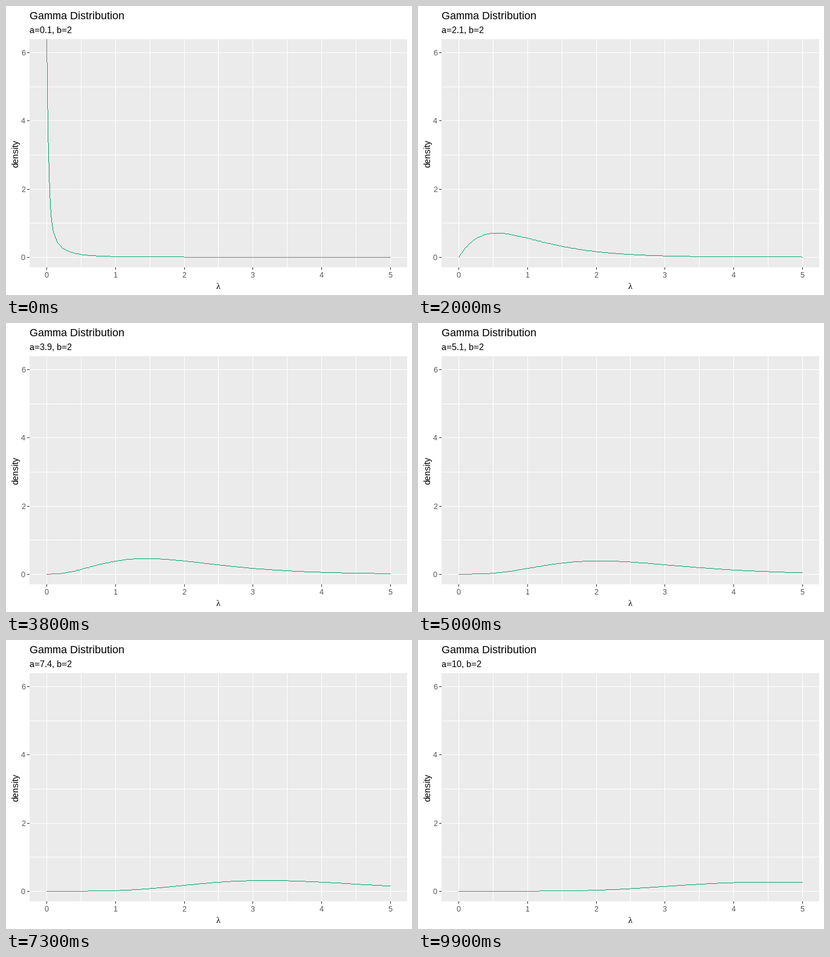
Write a matplotlib script that moves like this. It is 672 px wide and 480 px high and loops after 10 s.

```python
import math

import matplotlib.pyplot as plt
import numpy as np
from matplotlib.animation import FuncAnimation
from matplotlib.patches import Rectangle

W, H, DPI = 672, 480, 96
LEFT, RIGHT, TOP, BOTTOM = 39, 664, 55, 434      # panel, in pixels
X0, X_UNIT = 67.53, 113.74
Y0, Y_UNIT = 417.062, 56.52
RATE = 2
FRAMES, INTERVAL = 100, 100

GREEN = (0, 166, 115, 255)
GREY = (127, 127, 127, 255)

plt.rcParams.update({
    "font.family": "Liberation Sans",
    "text.hinting": "default",
    "text.hinting_factor": 1,
})


def px(x):
    return np.floor(X0 + X_UNIT * np.asarray(x)).astype(int)


def py(y):
    return np.floor(Y0 - Y_UNIT * np.asarray(y)).astype(int)


def gamma_pdf(x, a):
    """Gamma density with shape a and rate RATE, including x = 0."""
    y = np.empty_like(x)
    y[0] = np.inf if a < 1 else RATE if a == 1 else 0
    t = x[1:]
    y[1:] = np.exp(a * math.log(RATE) + (a - 1) * np.log(t)
                   - RATE * t - math.lgamma(a))
    return y


def trace(cols, rows):
    """Pixels of a one-pixel polyline through integer vertices."""
    out_c, out_r = [], []
    for c0, r0, c1, r1 in zip(cols, rows, cols[1:], rows[1:]):
        n = max(abs(c1 - c0), abs(r1 - r0)) + 1
        out_c.append(np.rint(np.linspace(c0, c1, n)))
        out_r.append(np.rint(np.linspace(r0, r1, n)))
    return (np.concatenate(out_c).astype(int),
            np.concatenate(out_r).astype(int))


fig = plt.figure(figsize=(W / DPI, H / DPI), dpi=DPI, facecolor="white")
ax = fig.add_axes([0, 0, 1, 1])
ax.set_axis_off()


def box(x, y, w, h, color):
    ax.add_patch(Rectangle((x, y), w, h, fc=color, lw=0,
                           antialiased=False, zorder=1))


def label(x, y, text, size, color="black", **kw):
    kw.setdefault("va", "baseline")
    return ax.text(x, y, text, fontsize=size, color=color, zorder=4, **kw)


# Panel and grid
grid_cols = px(np.arange(0, 5.1, 0.5))
grid_rows = py(np.arange(0, 7))
on_grid = np.zeros((H, W), bool)
on_grid[:, grid_cols] = True
on_grid[grid_rows, :] = True

box(LEFT, TOP, RIGHT - LEFT, BOTTOM - TOP, "#EBEBEB")
for c in grid_cols:
    box(c, TOP, 1, BOTTOM - TOP, "white")
for r in grid_rows:
    box(LEFT, r, RIGHT - LEFT, 1, "white")

# Ticks and labels
for v in range(6):
    c = int(px(v))
    box(c, BOTTOM, 1, 4, "#333333")
    label(c, 451, str(v), 8.8, "#4D4D4D", ha="center")
for v in range(0, 7, 2):
    r = int(py(v))
    box(LEFT - 4, r, 4, 1, "#333333")
    label(32, r + 5, str(v), 8.8, "#4D4D4D", ha="right")

label(39, 22, "Gamma Distribution", 13.2)
subtitle = label(39, 45, "", 11)
label(351, 470, "λ", 11, ha="center", family="Liberation Serif")
label(20, 244.5, "density", 11, rotation=90, rotation_mode="anchor",
      ha="center")

xs = np.linspace(0, 5, 250)
cols = px(xs)
layer = ax.imshow(np.zeros((H, W, 4), np.uint8), extent=(0, W, H, 0),
                  aspect="auto", interpolation="nearest", zorder=3)
ax.set_xlim(0, W)
ax.set_ylim(H, 0)


def draw(i):
    a = (i + 1) / 10
    ys = np.minimum(gamma_pdf(xs, a), 100)
    c, r = trace(cols, np.maximum(py(ys), TOP))
    img = np.zeros((H, W, 4), np.uint8)
    img[r, c] = np.where(on_grid[r, c, None], GREY, GREEN)
    layer.set_data(img)
    subtitle.set_text(f"a={a:g}, b={RATE}")
    return layer, subtitle


anim = FuncAnimation(fig, draw, frames=FRAMES, interval=INTERVAL,
                     repeat=True, repeat_delay=0)
plt.show()
```
